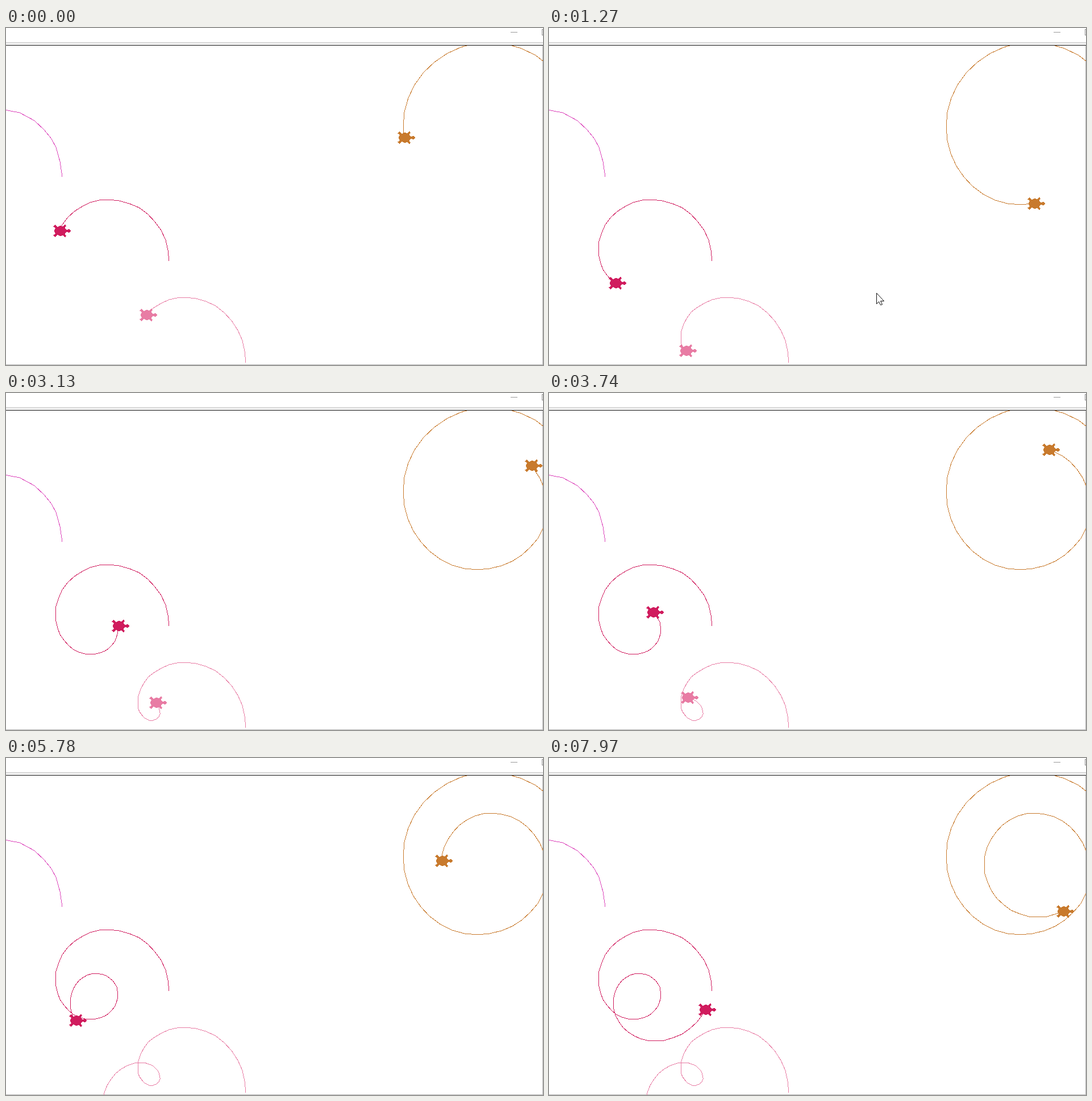
Write an HTML page that moves like this. It is 945x593 px and loops after 8000 ms.

```html
<!DOCTYPE html>
<html lang="en">
<head>
<meta charset="utf-8">
<title>Turtle spirals</title>
<style>
  html, body { margin: 0; width: 100%; height: 100%; overflow: hidden; background: #fff; }
  svg { display: block; }
</style>
</head>
<body>
<svg id="stage" width="945" height="593" viewBox="0 0 945 593" shape-rendering="crispEdges">
  <defs>
    <clipPath id="canvas"><rect y="31" width="945" height="562"/></clipPath>
    <polygon id="turtle" transform="scale(1.25)" stroke-width=".8" points="16,0 14,2 10,1 7,4 9,7 8,9 5,6 1,7 -3,5 -6,8 -8,6 -5,4 -7,0 -5,-4 -8,-6 -6,-8 -3,-5 1,-7 5,-6 8,-9 9,-7 7,-4 10,-1 14,-2"/>
  </defs>
  <rect y="25" width="945" height="5" fill="#f0f0f0"/>
  <rect y="25" width="945" height="1" fill="#c4c4c4"/>
  <rect y="30" width="945" height="1" fill="#1c1c1c"/>
  <rect x="888" y="7" width="12" height="1" fill="#999"/>
  <path d="M945 2.5H943.5V12.5H945" fill="none" stroke="#888"/>
  <path d="M944.5 31V592.5M0 592.5H945" fill="none" stroke="#b4b4b4"/>
  <polyline points="0,144.5 24,149 50,163 67,179 80,195 88,210 95,235 99,262" fill="none" stroke="#dc46bb"/>
  <g id="spirals" clip-path="url(#canvas)"></g>
  <path id="cursor" d="M576.5 466.5V485.5L580.5 481.5L583.5 487.5L586.5 486.5L583.5 480.5H589.5Z" fill="#fff" stroke="#111" shape-rendering="auto"/>
</svg>
<script>
const LOOP = 8000;
const STEPS_PER_QUARTER = 9;
const KEY_TIMES = [0, 1270, 3130, 4460, 5780, 6660, 7970];

// extremes: right, top, left, bottom, ... of each spiral
// turns: quarter turns completed at each key time
const turtles = [
  {
    color: '#e87ca4',
    extremes: [[422, 589], [315, 474], [232, 545], [256, 576], [271, 563], [238, 536], [168.5, 616], [240, 690], [320, 610]],
    turns: [1.624, 2.53, 4.46, 5.43, 6.05, 6.4, 7]
  },
  {
    color: '#d01c5e',
    extremes: [[287, 410], [180, 302], [87, 390], [150, 460], [197, 416], [158, 379], [113, 430], [186, 498], [283, 405]],
    turns: [1.755, 2.638, 4.1, 5.296, 6.306, 6.935, 7.73]
  },
  {
    color: '#c87a2d',
    extremes: [[1012, 200], [852, 25], [699, 174], [830, 311], [952, 200], [855, 97], [766, 188], [860, 280], [957, 187]],
    turns: [2.087, 3.126, 4.497, 5.275, 5.948, 6.413, 7.3]
  }
];

// The picture holds still between these bursts of evenly spaced updates.
const bursts = [
  [70, 800, 11], [880, 1650, 11], [1730, 2510, 11], [2590, 3360, 11], [3440, 4230, 11],
  [4310, 5070, 11], [5150, 5950, 11], [6030, 6800, 11], [6880, 7660, 11], [7740, 7970, 4]
];
const updateTimes = [0, ...bursts.flatMap(([first, last, count]) =>
  Array.from({ length: count }, (_, i) => first + (last - first) * i / (count - 1)))];

// Smooth interpolation through unevenly spaced keys.
function interpolate(times, values, t) {
  const end = times.length - 1;
  let i = 0;
  while (i < end - 1 && t >= times[i + 1]) i++;
  const slope = k => {
    const a = Math.max(k - 1, 0), b = Math.min(k + 1, end);
    return (values[b] - values[a]) / (times[b] - times[a]);
  };
  const span = times[i + 1] - times[i];
  const u = (t - times[i]) / span;
  const v = 1 - u;
  return v * v * (1 + 2 * u) * values[i] + u * u * (3 - 2 * u) * values[i + 1]
    + span * u * v * (v * slope(i) - u * slope(i + 1));
}

// Each quarter turn is a quarter ellipse between neighbouring extremes.
function pointAt(extremes, turn) {
  const quarter = Math.min(Math.floor(turn), extremes.length - 2);
  const angle = (turn - quarter) * Math.PI / 2;
  const [x0, y0] = extremes[quarter], [x1, y1] = extremes[quarter + 1];
  const late = 1 - Math.cos(angle), early = Math.sin(angle);
  const [ux, uy] = quarter % 2 ? [early, late] : [late, early];
  return [x0 + (x1 - x0) * ux, y0 + (y1 - y0) * uy];
}

function addSvg(name, attributes) {
  const node = document.createElementNS('http://www.w3.org/2000/svg', name);
  for (const key in attributes) node.setAttribute(key, attributes[key]);
  return document.getElementById('spirals').appendChild(node);
}

for (const turtle of turtles) {
  turtle.trail = addSvg('polyline', { fill: 'none', stroke: turtle.color });
  turtle.body = addSvg('use', { href: '#turtle', fill: turtle.color, stroke: turtle.color });
}

const cursor = document.getElementById('cursor');

function draw(now) {
  const time = now % LOOP;
  const held = updateTimes.findLast(start => start <= time + 10);
  for (const { extremes, turns, trail, body } of turtles) {
    const turn = interpolate(KEY_TIMES, turns, held);
    const position = pointAt(extremes, turn);
    const points = [];
    for (let i = 0; i < turn * STEPS_PER_QUARTER; i++) {
      points.push(pointAt(extremes, i / STEPS_PER_QUARTER));
    }
    points.push(position);
    trail.setAttribute('points', points.map(p => p.map(Math.round)).join(' '));
    body.setAttribute('transform', `translate(${position.map(Math.round)})`);
  }
  cursor.style.display = held > 1090 && held < 1500 ? '' : 'none';
}

const begin = performance.now();
function tick() {
  draw(performance.now() - begin);
  requestAnimationFrame(tick);
}
tick();
</script>
</body>
</html>
```
